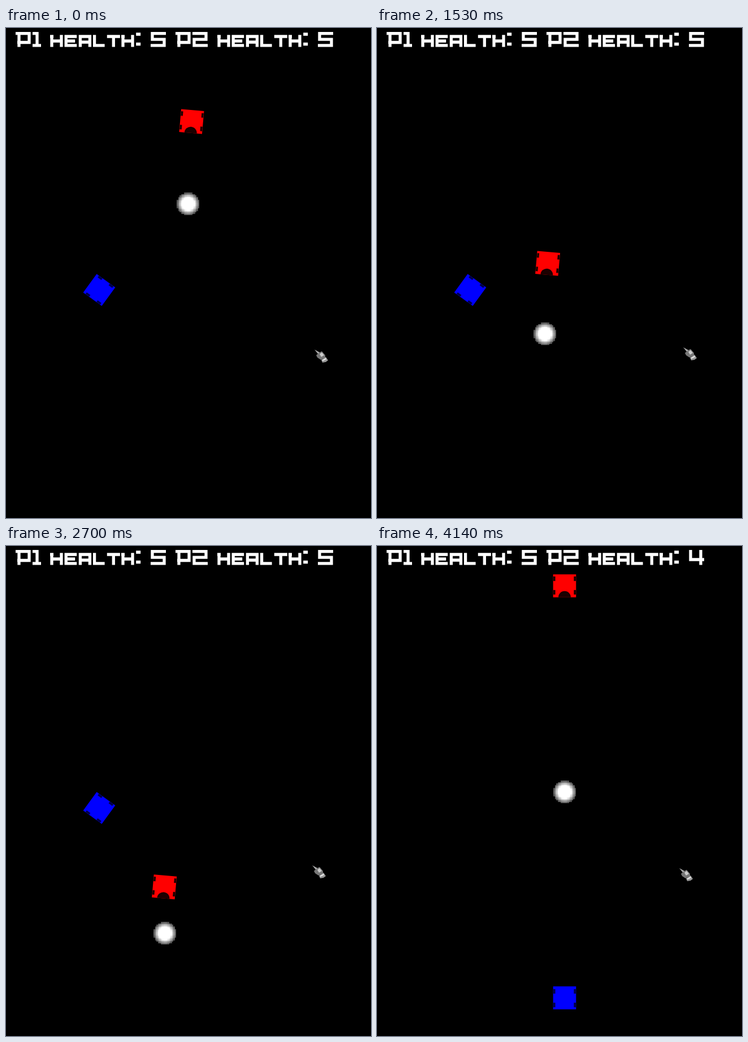
An HTML page with a canvas for the animation above (4170 ms loop, 646 by 867 pixels).

```html
<!DOCTYPE html>
<html lang="en">
<head>
<meta charset="utf-8">
<title>Tank ball duel</title>
<style>
  html, body { margin: 0; width: 100%; height: 100%; overflow: hidden; background: #000; }
  canvas { display: block; }
</style>
</head>
<body>
<canvas id="stage" width="646" height="867" role="img" aria-label="P1 health: 5 P2 health: 5"></canvas>
<script>
const ctx = document.getElementById('stage').getContext('2d');
const LOOP = 4170, RESET = 3680;

// Speeds in px per ms, accelerations in px per ms²
const THRUST = 0.00034, TANK_DRAG = 0.000138, BALL_DRAG = 0.000145;

// Distance gained per unit of acceleration since time t = 0
const ramp = t => Math.max(0, t) ** 2 / 2;

// Progress from 0 to 1 between two times
const slide = (t, from, to) => Math.min(1, Math.max(0, (t - from) / (to - from)));

// The tank coasts under drag, with the throttle held twice
function tankAt(t) {
  const throttle = ramp(t) - ramp(t - 540) + ramp(t - 1820) - ramp(t - 2372);
  const d = 0.057 * t - TANK_DRAG * ramp(t) + (THRUST + TANK_DRAG) * throttle;
  return [328.5 - 0.098 * d - 0.0000285 * d * d, 165.5 + d];
}

// Distance rolled after a hit, until drag stops the ball
function roll(speed, t) {
  const dt = Math.min(Math.max(0, t), speed / BALL_DRAG);
  return speed * dt - BALL_DRAG * ramp(dt);
}

function ballAt(t) {
  const first = roll(0.3315, t - 677), second = roll(0.2656, t - 2955);
  return [322 - 0.11 * first - 0.135 * second, 311 + first + second];
}

function cursorAt(t) {
  const up = slide(t, 0, 540), left = slide(t, 900, 1200);
  const down = slide(t, 3000, 3400), last = slide(t, 3950, 4140);
  return [546 + 2 * up - 6 * left - 4 * down - 3 * last, 569 - 5 * up + left + 2 * down + 3 * last];
}

const glyphs = {
  P: 'M0 2.7H24V18.5H3M6 0V26.5',
  1: 'M0 2.7H8V24M0 23.8H15',
  2: 'M0 2.7H24V13.2H3V23.8H27',
  4: 'M3 0V17H27M21 0V26.5',
  5: 'M27 2.7H3V13.2H24V23.8H0',
  h: 'M0 8H6M3 5.3V26.5M3 16H20M20 5.3V26.5',
  e: 'M22 8H3V23.8H22M3 16H19',
  a: 'M3 26.5V8H20V26.5M3 18H20',
  l: 'M3 5.3V23.8H21',
  t: 'M0 8H23M11.5 8V26.5',
  ':': 'M1 4H9M1 21.5H9'
};
for (const key in glyphs) glyphs[key] = new Path2D(glyphs[key]);

// Caps advance by 30, small letters by 25
function drawText(text, x) {
  for (const ch of text) {
    ctx.save();
    ctx.translate(x, 7);
    ctx.stroke(glyphs[ch]);
    ctx.restore();
    x += /[a-z:]/.test(ch) ? 25.2 : 30;
  }
}

function drawScore(...health) {
  ctx.strokeStyle = '#fff';
  ctx.lineWidth = 5.3;
  health.forEach((points, i) => {
    const x = i ? 300 : 17;
    drawText('P' + (i + 1), x);
    drawText('health:', 78 + i * 296);
    drawText(String(points), 256 + i * 296);
  });
}

// Soft 16 x 16 ball sprite, enlarged without smoothing
const ball = document.createElement('canvas');
ball.width = ball.height = 16;
const bc = ball.getContext('2d');
for (let i = 0; i < 256; i++) {
  const x = i % 16, y = i >> 4, r = Math.hypot(x - 7.5, y - 7.5);
  if (r > 8.1) continue;
  bc.fillStyle = `rgba(255,255,255,${Math.min(1, 0.27 + (8.1 - r) * 0.21)})`;
  bc.fillRect(x, y, 1, 1);
}

function drawBall([x, y]) {
  ctx.imageSmoothingEnabled = false;
  ctx.drawImage(ball, Math.round(x) - 20, Math.round(y) - 20, 40, 40);
}

function drawTank([x, y], degrees, color, dark, nose) {
  ctx.save();
  ctx.translate(x, y);
  ctx.rotate(degrees * Math.PI / 180);
  ctx.fillStyle = color;
  ctx.fillRect(-20.3, -20.3, 40.6, 40.6);
  ctx.fillStyle = dark;
  for (const side of [-18.2, 18.2]) {
    for (const end of [-12, 12]) ctx.fillRect(side - 1.8, end - nose - 4, 3.6, 8);
  }
  if (nose > 0) {
    ctx.beginPath();
    ctx.arc(0, 20.3, 11, Math.PI, 0);
    ctx.fill();
  }
  ctx.restore();
}
const drawRed = (pos, deg) => drawTank(pos, deg, '#f00', '#1c0000', 0.6);
const drawBlue = (pos, deg) => drawTank(pos, deg, '#00f', '#000048', -0.6);

function poly(color, path) {
  ctx.fillStyle = color;
  ctx.fill(new Path2D(path));
}

function drawCursor([x, y]) {
  ctx.save();
  ctx.translate(Math.round(x), Math.round(y));
  poly('#aaa', 'M0 0L11 6 8 10Z');
  poly('#777', 'M3 10L9 5 13 3 19 10 19 14 11 18 5 14Z');
  poly('#ccc', 'M9 8L13 5 17 10 12 13Z');
  poly('#999', 'M12 18L20 13 24 19 20 22 14 23Z');
  poly('#eee', 'M13 19L20 15 21 17 15 20Z');
  ctx.restore();
}

function draw(t) {
  const playing = t < RESET;
  ctx.fillStyle = '#000';
  ctx.fillRect(0, 0, 646, 867);
  drawBlue(playing ? [165, 463.5] : [332, 799.5], playing ? -54 : 0);
  drawRed(playing ? tankAt(t) : [332, 70.5], playing ? 5 : 0);
  drawBall(playing ? ballAt(t) : [332, 435]);
  drawScore(5, playing ? 5 : 4);
  drawCursor(cursorAt(t));
}

const start = performance.now();
function frame() {
  draw((performance.now() - start) % LOOP);
  requestAnimationFrame(frame);
}
frame();
</script>
</body>
</html>
```
